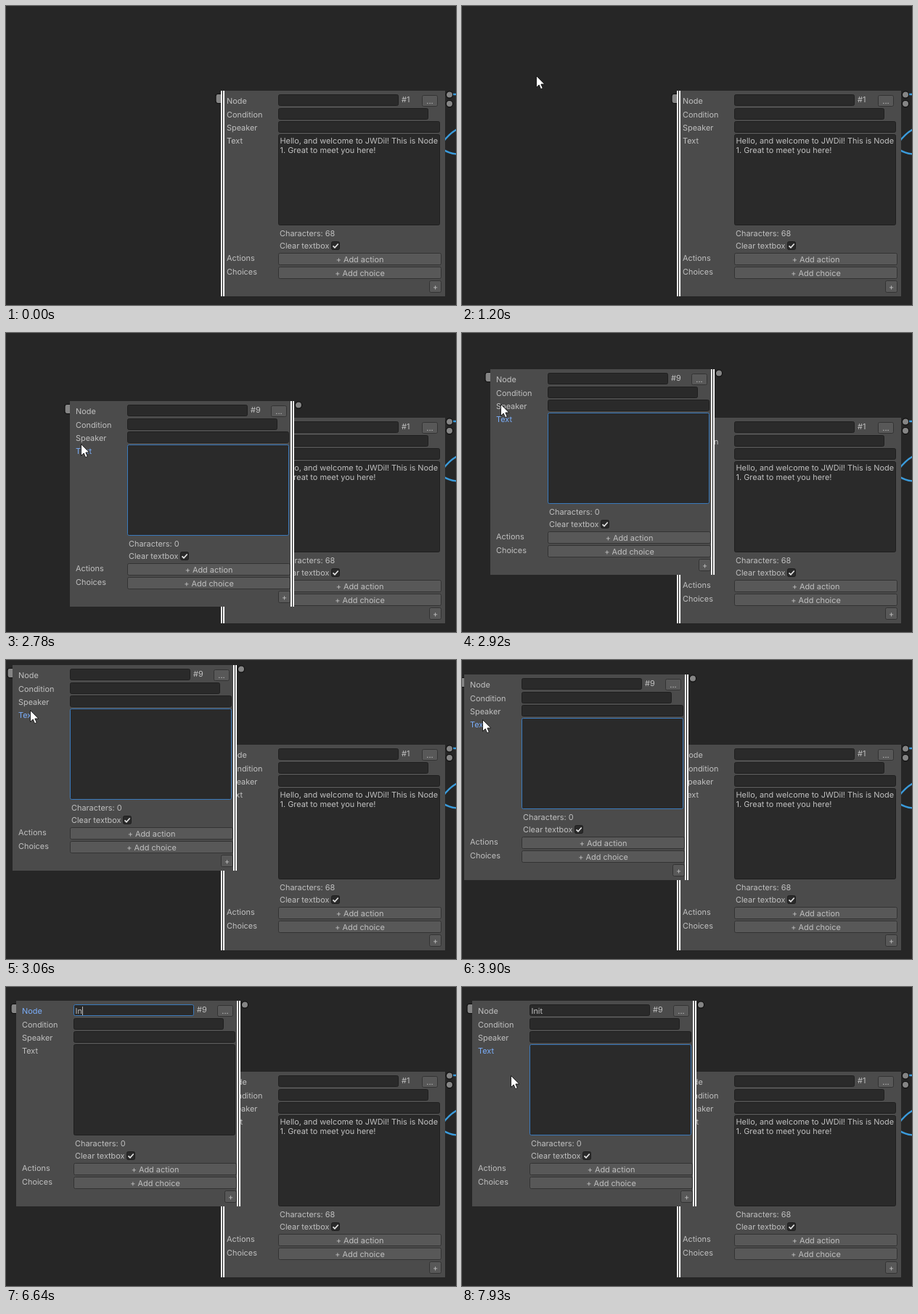
Recreate the animation shown at these times as an HTML page. Size 620 by 413 pixels, loop 8 s.

```html
<!DOCTYPE html>
<html lang="en">
<head>
<meta charset="utf-8">
<style>
html, body { margin: 0; width: 100%; height: 100%; overflow: hidden; background: #262626; }
svg { display: block; font: 10.9px Inter, sans-serif; text-rendering: geometricPrecision; }
text { fill: #c0c0c0; white-space: pre; }
.panel { fill: #4b4b4b; }
.field { fill: #2a2a2a; stroke: #1f1f1f; }
.field.hover { stroke: #747474; }
.field.focus { stroke: #3a79bb; }
.button { fill: #585858; stroke: #333; }
.port { fill: #858585; stroke: #111; stroke-width: 1.2; }
.blue { fill: #7baefa; }
.wire { fill: none; stroke: #3a9bdc; stroke-width: 2.3; }
</style>
</head>
<body>
<svg id="stage" width="620" height="413" viewBox="0 0 620 413"></svg>
<script>
const stage = document.getElementById('stage');
const LOOP = 8000;

// Input rows relative to the node, evenly stacked; only the last one is tall
const WIDTHS = { Node: 166, Condition: 207, Speaker: 223, Text: 223 };
const fields = Object.entries(WIDTHS).map(([name, w], i) =>
  ({ name, x: 79, y: Math.round(5.4 + 18.3 * i), w, h: name === 'Text' ? 126 : 16 }));

const rect = (cls, x, y, w, h, attrs = '') =>
  `<rect class="${cls}" x="${x + .5}" y="${y + .5}" width="${w - 1}" height="${h - 1}" rx="2" ${attrs}/>`;
const text = (x, y, s, attrs = '') => `<text x="${x}" y="${y - .5}" ${attrs}>${s}</text>`;
const button = (x, y, w, h, label) =>
  rect('button', x, y, w, h) + text(x + w / 2, y + h / 2 + 4.5, label, 'text-anchor="middle"');
const fieldRow = ({ name, x, y, w, h }) =>
  text(8, y + 13, name, `data-label="${name}"`) + rect('field', x, y, w, h, `data-field="${name}"`);
const buttonRow = (name, i) =>
  text(8, 235 + 19 * i, name + 's') +
  button(79, 224 + 19 * i, 225, 17, '+ Add ' + name.toLowerCase());
const port = y => `<circle class="port" cx="315" cy="${y}" r="4.6"/>`;
const bar = x => `<rect x="${x}" width="2" height="284" fill="#fff"/>`;

const node = (id, number, lines, ports, barX) => `<g id="${id}">
  <rect class="port" x="-7" y="4.5" width="13" height="13" rx="3"/>
  ${ports.map(port).join('')}
  <rect class="panel" width="309" height="284"/>
  ${fields.map(fieldRow).join('')}
  ${text(249, 16, '#' + number)}
  ${lines.map((s, i) => text(81.5, 73 + 13 * i, s)).join('')}
  ${text(81, 201, 'Characters: ' + (lines.length ? 68 : 0))}
  ${text(81, 218, 'Clear textbox')}
  ${rect('field', 152, 208, 12, 12)}
  <path d="M154.500 214.300l2.500 2.500 4.700-5.300" fill="none" stroke="#e4e4e4" stroke-width="1.7"/>
  ${button(277, 6, 22, 16, '...')}
  ${['Action', 'Choice'].map(buttonRow).join('')}
  ${button(287, 262, 17, 17, '+')}
  <rect x="${barX}" width="5" height="284" fill="#111"/>${bar(barX)}${bar(barX + 3)}
</g>`;

stage.innerHTML = `
  <rect width="620" height="413" fill="#262626"/>
  <path class="wire" d="M612 122H621M602 188Q611 176 621 170.500M602 198Q611 204 621 204.500"/>
  ${node('first', 1, ['Hello, and welcome to JWDil! This is Node', '1. Great to meet you here!'], [5.5, 18], 0)}
  ${node('second', 9, [], [5.5], 304)}
  <g id="menu">
    <rect x="103" y="97" width="136" height="22" fill="#78a4cd"/>
    <text x="135" y="112" style="font:11.5px 'Open Sans',sans-serif;fill:#0a0a0a">Add node</text>
  </g>
  <path id="arrow" d="M.5 .5V16.500L4.200 13 6.600 18.700 9.300 17.500 6.900 12H11.800Z" fill="#fff" stroke="#111" stroke-width=".9"/>
  <path id="beam" d="M-3-7H-1L0-6 1-7H3M0-6V6M-3 7H-1L0 6 1 7H3" fill="none" stroke="#e2e2e2"/>`;

const [first, second, menu, arrow, beam] =
  ['first', 'second', 'menu', 'arrow', 'beam'].map(id => document.getElementById(id));
first.setAttribute('transform', 'translate(296 117)');
second.insertAdjacentHTML('beforeend',
  text(81.5, 18, '', 'id="typed"') + '<rect id="caret" y="8" width="1" height="12" fill="#b8b8b8"/>');
const typed = document.getElementById('typed');
const caret = document.getElementById('caret');

const phase = (t, from, to) => Math.min(1, Math.max(0, (t - from) / (to - from)));
const ease = u => u * u * (3 - 2 * u);

// Adds up eased moves: start, end, dx, dy
const travel = (t, origin, moves) => moves.reduce(([x, y], [from, to, dx, dy]) => {
  const e = ease(phase(t, from, to));
  return [x + dx * e, y + dy * e];
}, origin);

const dragged = t => travel(t, [0, 0], [
  [2700, 3060, -91, 0], [2780, 3060, 0, -87],
  [3180, 3300, 0, 10], [3390, 3470, -6, 3], [3910, 4070, 11, -1]
]);

// The pointer leads the dragged node slightly and swings out before clicking the name field
function pointer(t) {
  const [x, y] = travel(t, [395, 420], [
    [695, 1200, -293, -324], [1350, 1640, 27, 7], [2050, 2360, -5, 53],
    [4220, 4370, 82, -47], [4710, 4890, -8, 14], [5140, 5480, 7, -17], [7410, 7930, -52, 91]
  ]);
  const [dx, dy] = dragged(t + 30);
  const swing = Math.sin(Math.PI * phase(t, 5140, 5480));
  return [x + dx + 25 * swing, y + dy - 32 * swing];
}

const show = (el, on) => el.setAttribute('visibility', on ? 'visible' : 'hidden');
const move = (el, x, y) => el.setAttribute('transform', `translate(${x} ${y})`);

function draw(t) {
  const [dx, dy] = dragged(t);
  const nx = Math.round(100 + dx), ny = Math.round(94 + dy);
  const [px, py] = pointer(t).map(Math.round);
  const added = t >= 2070;
  const focus = t < 2700 ? '' : t >= 5690 && t < 7900 ? 'Node' : 'Text';
  const pointing = t >= 710 && (t < 5855 || t >= 7440);

  let hover = '';
  for (const { name, x, y, w, h } of fields) {
    const u = px - nx - x, v = py - ny - y;
    if (added && pointing && u >= 0 && u < w && v >= 0 && v < h) hover = name;
    const field = second.querySelector(`[data-field=${name}]`).classList;
    field.toggle('hover', hover === name);
    field.toggle('focus', focus === name);
    second.querySelector(`[data-label=${name}]`).classList.toggle('blue', focus === name);
  }

  move(second, nx, ny);
  second.style.display = added ? '' : 'none';
  show(menu, t >= 1350 && !added);

  typed.textContent = 'Init'.slice(0, Math.max(0, 1 + Math.floor((t - 6460) / 145)));
  caret.setAttribute('x', Math.round(82 + typed.getComputedTextLength()));
  show(caret, focus === 'Node');

  move(arrow, px, py);
  move(beam, px + .5, py);
  show(arrow, pointing && !hover);
  show(beam, pointing && hover);
}

function frame() {
  draw(performance.now() % LOOP);
  requestAnimationFrame(frame);
}
frame();
</script>
</body>
</html>
```
